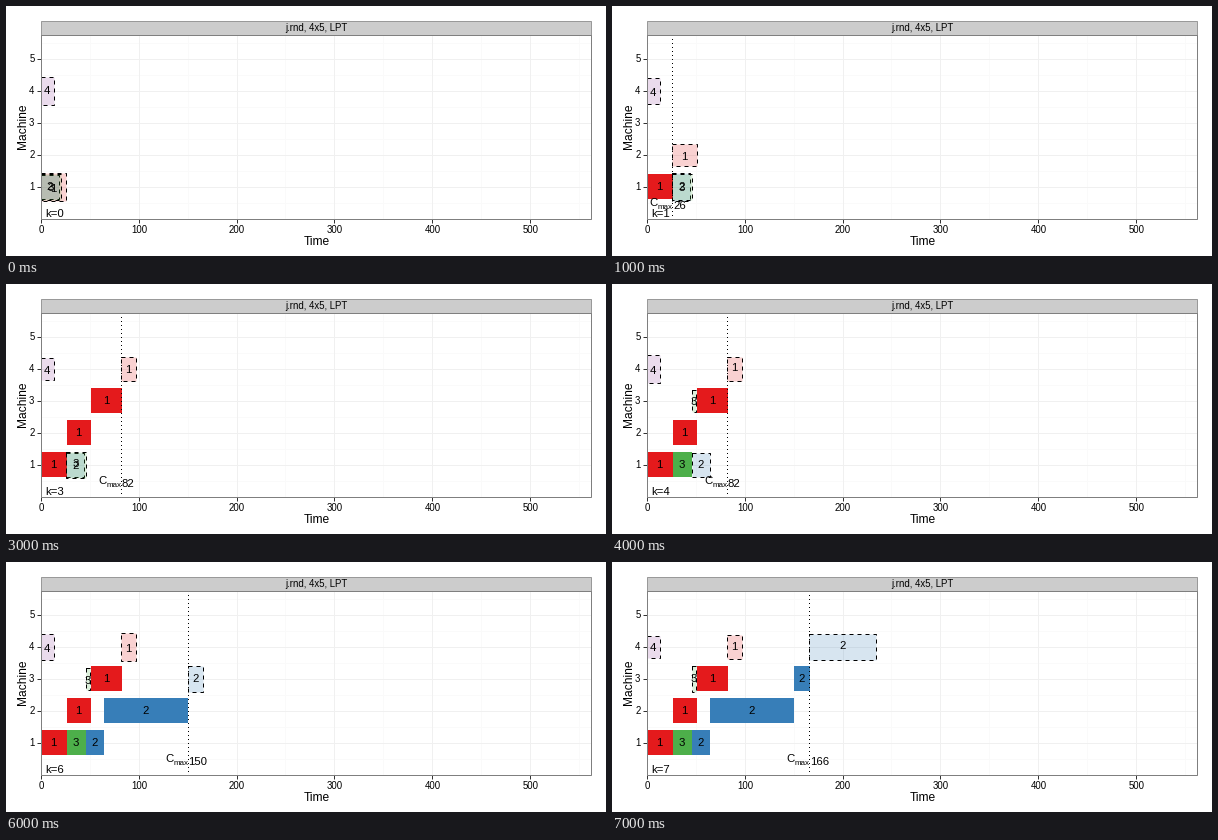
Write a matplotlib script that moves like this. It is 600 px wide and 250 px high and loops after 8000 ms.

```python
import random

import matplotlib.pyplot as plt
from matplotlib.animation import FuncAnimation
from matplotlib.patches import Rectangle
from matplotlib.transforms import Affine2D

W, H, DPI = 600, 250, 100
PX = 72 / DPI
LEFT, RIGHT, TOP, BOTTOM = 35.5, 585.5, 28.5, 212.5
X_SCALE, ROW = 0.9775, 32
MAJOR, MINOR, TICK = "#f0f0f0", "#fafafa", "#333333"

COLORS = {1: "#e41a1c", 2: "#377eb8", 3: "#4daf4a", 4: "#984ea3"}
# Operations of each job: (machine, duration)
JOBS = {
    1: [(1, 26), (2, 25), (3, 31), (4, 15)],
    2: [(1, 18), (2, 86), (3, 16), (4, 68)],
    3: [(1, 20), (3, 4)],
    4: [(4, 13)],
}

plt.rcParams["font.family"] = "Liberation Sans"
fig = plt.figure(figsize=(W / DPI, H / DPI), dpi=DPI, facecolor="white")
ax = fig.add_axes([0, 0, 1, 1])
ax.set_xlim(0, W)
ax.set_ylim(H, 0)
ax.axis("off")
# Keeps snapped one-pixel strokes on the pixel they fall in
STROKE = ax.transData + Affine2D().translate(-0.5, -0.5)


def px(time):
    return LEFT + time * X_SCALE


def py(machine):
    return BOTTOM - machine * ROW


def line(x, y, color, **kw):
    return ax.plot(x, y, color=color, lw=PX, solid_capstyle="butt",
                   dash_capstyle="butt", transform=STROKE, **kw)[0]


def text(x, baseline, label, size, ha="center"):
    return ax.text(x, baseline, label, fontsize=size * PX, ha=ha,
                   va="baseline", color="black")


def box(x0, x1, y, half, **kw):
    return ax.add_patch(Rectangle((x0, y - half), x1 - x0, 2 * half, **kw))


def draw_axes():
    for t in range(50, 560, 100):
        line([px(t)] * 2, [TOP, BOTTOM], MINOR, zorder=0)
    for i in range(6):
        line([LEFT, RIGHT], [py(i + 0.5)] * 2, MINOR, zorder=0)
    for t in range(0, 560, 100):
        x = px(t)
        line([x, x], [TOP, BOTTOM], MAJOR, zorder=0)
        line([x, x], [BOTTOM, BOTTOM + 4], TICK)
        text(x, 227.4, str(t), 9.6)
    for m in range(1, 6):
        y = py(m)
        line([LEFT, RIGHT], [y, y], MAJOR, zorder=0)
        line([LEFT - 4, LEFT], [y, y], TICK)
        text(28.5, y + 3.4, str(m), 9.6, "right")
    edge = dict(lw=PX, transform=STROKE)
    box(LEFT, RIGHT, 21.5, 7, fc="#cccccc", ec="#999999", **edge)
    box(LEFT, RIGHT, (TOP + BOTTOM) / 2, (BOTTOM - TOP) / 2, fc="none",
        ec="#7f7f7f", zorder=2.5, **edge)
    text(310.5, 25, "j.rnd, 4x5, LPT", 9.6)
    text(310.5, 239.3, "Time", 12)
    ax.text(17, 120.5, "Machine", fontsize=12 * PX, rotation=90,
            ha="center", va="center", color="black")


def next_slot(job, done):
    """Earliest gap for the job's next operation: (job, machine, start, end)."""
    mine = [op for op in done if op[0] == job]
    if len(mine) == len(JOBS[job]):
        return None
    machine, length = JOBS[job][len(mine)]
    start = max((op[3] for op in mine), default=0)
    for _, _, begin, end in sorted((op for op in done if op[1] == machine),
                                   key=lambda op: op[2]):
        if start < end and start + length > begin:
            start = end
    return job, machine, start, start + length


def candidates(done):
    slots = (next_slot(job, done) for job in JOBS)
    return [slot for slot in slots if slot]


def schedule(steps):
    """Longest processing time first."""
    done = []
    for _ in range(steps):
        done.append(max(candidates(done), key=lambda op: op[3] - op[2]))
    return done


shown = []


def label(job, start, end, y):
    shown.append(text(px((start + end) / 2) - 0.5, y + 4, str(job), 11.4))


def update(step):
    while shown:
        shown.pop().remove()
    done = schedule(step)
    for job, machine, start, end in done:
        y = py(machine)
        shown.append(box(px(start), px(end), y, 12.8, fc=COLORS[job], lw=0))
        label(job, start, end, y)

    # Pending boxes get a jittered height and label
    rng = random.Random(step)
    for job, machine, start, end in candidates(done):
        y = py(machine)
        shown.append(box(px(start), px(end), y, rng.uniform(11, 14.5),
                         fc=(COLORS[job], 0.2), ec="black", lw=PX,
                         ls=(0, (4, 4)), transform=STROKE))
        label(job, start, end, y + rng.uniform(-1.5, 2.5))

    shown.append(text(39.5, 211, f"k={step}", 11.4, "left"))
    if done:
        makespan = max(op[3] for op in done)
        x = px(makespan)
        shown.append(line([x, x], [BOTTOM, TOP], "black", ls=(0.5, (1, 3))))
        shown.append(text(x - 23.2, 200.4, "C", 11.4, "left"))
        shown.append(text(x - 15, 203.2, "max", 8, "left"))
        shown.append(text(x, 203, str(makespan), 11.4, "left"))
    return shown


draw_axes()
anim = FuncAnimation(fig, update, frames=8, interval=1000, repeat=True,
                     repeat_delay=0, init_func=lambda: [], blit=False)
plt.show()
```
